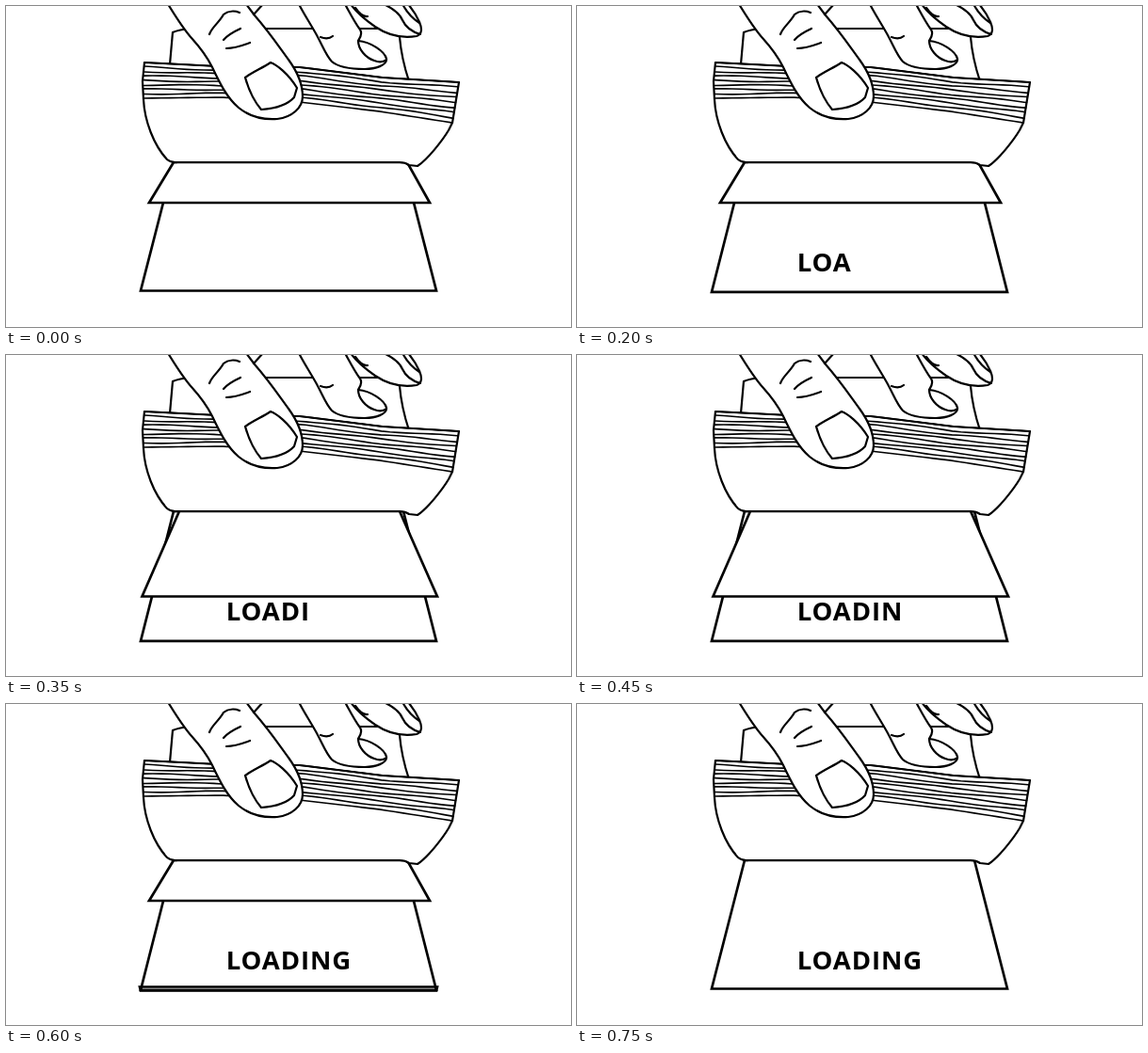
An HTML page that plays this animation: 600x341 px, repeating every 1750 ms.

```html
<!DOCTYPE html>
<html lang="en">
<head>
<meta charset="utf-8">
<title>Loading flipbook</title>
<style>
  html, body { margin: 0; width: 100%; height: 100%; overflow: hidden; background: #fff; }
  svg { display: block; width: 100%; height: 100%; }
  path { fill: #fff; stroke: #000; stroke-width: 2.2; stroke-linejoin: round; stroke-linecap: round; }
  .line { fill: none; }
  .sheet path { stroke-width: 2.7; stroke-linejoin: miter; }
  #stripes { fill: none; stroke-width: 1.6; }
  text { font: bold 27.5px "Open Sans", "Noto Sans", sans-serif; letter-spacing: 0.9px; }
</style>
</head>
<body>
<svg viewBox="0 0 600 341">
  <!-- raised page behind the stack -->
  <path d="M174 62L177 28Q184 25 196 24H410L418 33Q420 56 428 80"/>

  <!-- bottom page and the page in flight -->
  <g class="sheet">
    <path id="page"/>
    <path id="edge" class="line" d="M142 300.5H458L457 304.5H143Z"/>
    <text id="word" x="233.7" y="282"></text>
    <path id="flap"/>
  </g>

  <!-- bent stack -->
  <path d="M147 60L145 80L146 99C147 122 157 148 171 163Q176 167 182 166H418Q424 166 428 169L437 170C448 163 464 142 470 132L474 124L481 81L400 76L312 65L225 64Z"/>
  <path id="stripes"/>

  <!-- far finger -->
  <path d="M366 -2C372 7 382 15 392 22C404 30 418 35 436 32C442 30 442 24 439 17C436 10 432 4 427 -2"/>
  <path class="line" d="M401 -2C412 3 418 8 421 15Q426 26 440 30M421 -2Q428 11 439 18M371 2Q378 12 384 11"/>

  <!-- middle finger -->
  <path d="M311 -2C316 8 324 20 330 31C337 44 340 53 346 59C353 65 368 67 381 67C392 67 405 63 404 56C402 48 387 38 374 37Q379 30 376 25C370 17 365 7 360 -2"/>
  <path class="line" d="M374 37C374 46 382 55 391 58Q399 61 404 57M334 33Q342 36 347 32"/>

  <!-- near finger -->
  <path d="M172 -2C180 11 188 24 197 34C207 45 214 55 219 65C227 82 235 98 247 108C258 117 273 121 288 120C304 118 315 108 315 96C315 82 308 68 300 57C289 42 279 27 264 10L255 -2"/>
  <path class="line" d="M263 9L273 -2M254 76C262 70 272 66 281 60C287 62 300 72 309 87L306 97C299 105 285 109 271 110C265 103 258 90 254 76"/>
  <path class="line" d="M216 30C219 22 226 18 231 9C236 5 243 5 248 7M231 36Q236 30 249 24M234 45Q244 45 259 39"/>
</svg>
<script>
const LOOP = 1750, STEP = 50, LAST = 15;
const WORD = "LOADING";
const SMALL = "M178 166L152 209H450L426 166Z";
const LARGE = "M184 166L144.5 256.5H458L418 166Z";
const $ = id => document.getElementById(id);

// Hand-drawn page edges: interpolate between the stack's top and bottom outline.
const rails = [[147, 60, 146, 98], [225, 64, 228, 97], [312, 65, 312, 102], [400, 76, 397, 112], [481, 81, 474, 124]];
function stripe(t, k) {
  const at = x => {
    const i = Math.min(3, rails.findLastIndex(r => x >= r[0]));
    const [a, b] = [rails[i], rails[i + 1]];
    const u = (x - a[0]) / (b[0] - a[0]);
    const mix = n => a[n] + (b[n] - a[n]) * u;
    const wobble = t % 1 ? Math.sin(x / 17 + k * 2.4) * 0.7 : 0;
    return `${mix(0) + (mix(2) - mix(0)) * t} ${mix(1) + (mix(3) - mix(1)) * t + wobble}`;
  };
  const points = [];
  for (let x = 147; x < 481; x += 9) points.push(at(x));
  return "M" + points.join("L") + "L" + at(481);
}
$("stripes").setAttribute("d", Array.from({ length: 9 }, (_, k) => stripe(k / 8, k)).join(""));

function letters(i) {
  return i < 2 ? i : Math.floor((i + 3) / 2);
}

function draw(now) {
  const i = Math.min(LAST, Math.floor(now % LOOP / STEP));
  const resting = i === LAST;
  const bottom = i === 0 || resting ? 302.5 : 303.8;
  $("page").setAttribute("d", `M178 166H422L457 ${bottom}H143Z`);
  $("edge").style.display = i > 10 && !resting ? "" : "none";
  $("word").textContent = WORD.slice(0, letters(i));
  $("flap").setAttribute("d", resting ? "" : i % 2 ? LARGE : SMALL);
}

const start = performance.now();
function tick() {
  draw(performance.now() - start);
  requestAnimationFrame(tick);
}
tick();
</script>
</body>
</html>
```
